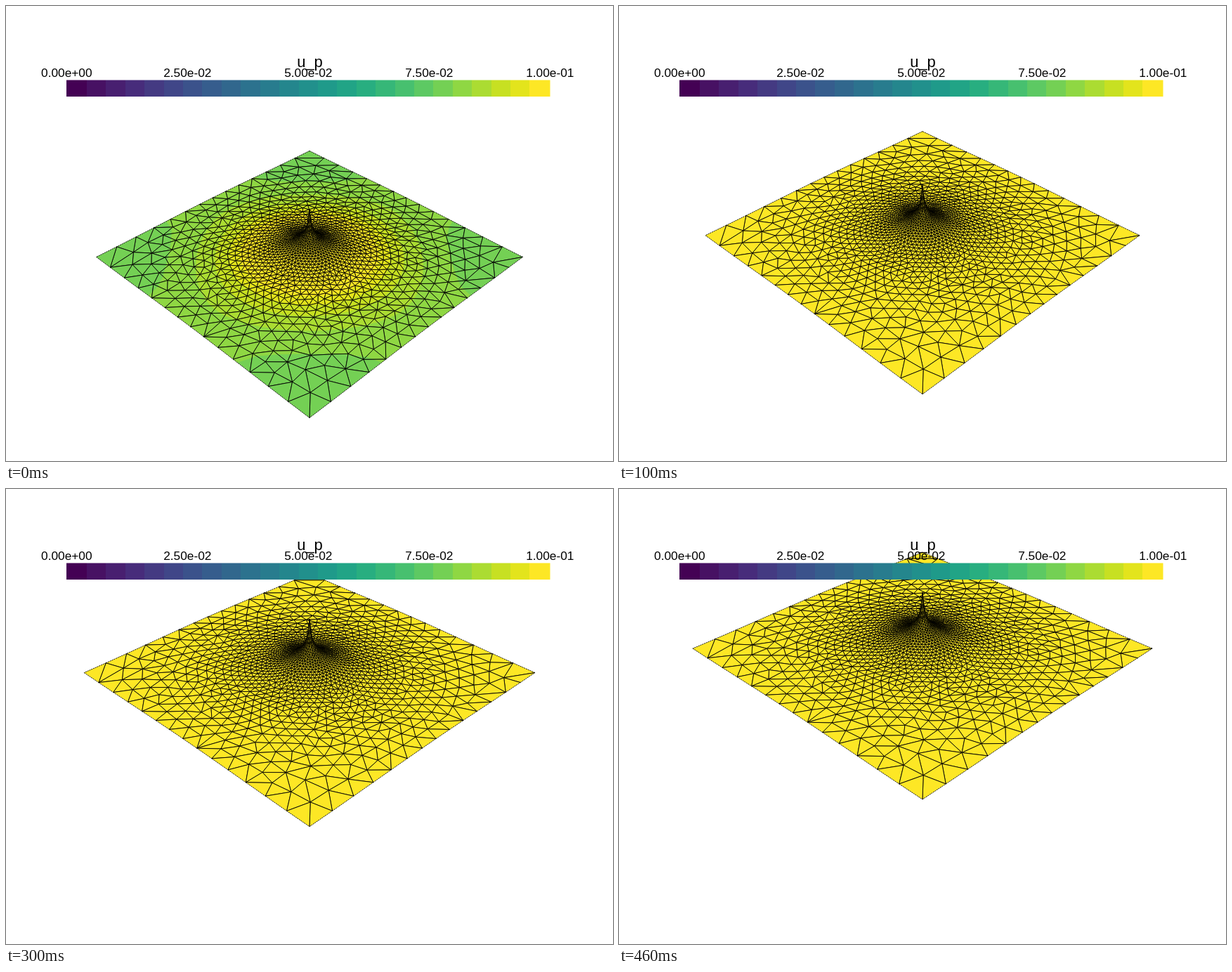
An HTML page with a canvas for the animation above (0.5 s loop, 864x648 px).

```html
<!DOCTYPE html>
<html lang="en">
<head>
<meta charset="utf-8">
<title>u_p</title>
<style>
html, body { margin: 0; width: 100%; height: 100%; overflow: hidden; background: #fff; }
canvas { display: block; }
</style>
</head>
<body>
<canvas id="stage" width="864" height="648"></canvas>
<script>
const ctx = document.getElementById('stage').getContext('2d');
const { abs, cos, sin, exp, log, hypot, floor, round, max, min, PI } = Math;
const STEP = 100, STEPS = 5, SIDE = 14, BANDS = 25;
const LOW = 0.0766, PEAK = 0.191, GAIN = 0.205, RISE = 0.088;

// Viridis colour map
const keys = ('440154 481567 482677 453781 404788 39568c 33638d 2d708e 287d8e 238a8d ' +
  '1f968b 20a387 29af7f 3cbb75 55c667 73d055 95d840 b8de29 dce319 fde725').split(' ')
  .map(k => [0, 2, 4].map(i => parseInt(k.slice(i, i + 2), 16)));
const colors = Array.from({ length: BANDS }, (_, i) => {
  const last = keys.length - 1, f = i / (BANDS - 1) * last, k = min(last - 1, floor(f));
  return `rgb(${keys[k].map((c, j) => round(c + (keys[k + 1][j] - c) * (f - k)))})`;
});
const band = u => max(0, min(BANDS - 1, floor(u * 250)));

// Point source in an insulated unit square
function green(x, y) {
  x = abs(x); y = abs(y);
  let g = y * y / 2 - y / 2 + 1 / 12;
  for (let n = -1; n <= 1; n++) {
    const e = exp(-2 * PI * abs(y + n));
    g -= log(1 - 2 * e * cos(2 * PI * x) + e * e) / (4 * PI);
  }
  return g;
}

// Graded mesh
let seed = 11;
const rand = () => {
  seed = (seed * 16807) % 2147483647;
  return seed / 2147483647 - 0.5;
};
const size = r => 0.0037 + 0.092 * r + 0.025 * r * r;

function seedPoints() {
  const pts = [[0, 0]];
  for (let r = size(0); r < 0.72; r += 0.866 * size(r)) {
    const h = size(r), n = round(2 * PI * r / h), phase = rand() * 6;
    for (let i = 0; i < n; i++) {
      const a = phase + 2 * PI * i / n;
      const x = r * cos(a) + rand() * h * 0.8, y = r * sin(a) + rand() * h * 0.8;
      if (max(abs(x), abs(y)) < 0.5 - 0.6 * h) pts.push([x, y]);
    }
  }
  const inner = pts.length;
  for (let i = 0; i < SIDE; i++) {
    const t = i / SIDE, s = t + 0.022 * sin(2 * PI * t) - 0.5;
    pts.push([s, -0.5], [0.5, s], [-s, 0.5], [-0.5, -s]);
  }
  return { pts, inner };
}

function triangulate(pts) {
  const n = pts.length, all = [...pts, [-60, -40], [60, -40], [0, 60]], base = n + 3;
  const make = (a, b, c) => {
    const [ax, ay] = all[a];
    const bx = all[b][0] - ax, by = all[b][1] - ay, cx = all[c][0] - ax, cy = all[c][1] - ay;
    const d = 2 * (bx * cy - by * cx), bb = bx * bx + by * by, cc = cx * cx + cy * cy;
    const x = (cy * bb - by * cc) / d, y = (bx * cc - cx * bb) / d;
    return { v: [a, b, c], x: ax + x, y: ay + y, r: x * x + y * y };
  };
  let tris = [make(n, n + 1, n + 2)];
  for (let i = 0; i < n; i++) {
    const [x, y] = all[i], keep = [], rim = new Set();
    for (const t of tris) {
      if ((t.x - x) ** 2 + (t.y - y) ** 2 >= t.r) { keep.push(t); continue; }
      for (let k = 0; k < 3; k++) {
        const a = t.v[k], b = t.v[(k + 1) % 3];
        if (!rim.delete(b * base + a)) rim.add(a * base + b);
      }
    }
    for (const e of rim) keep.push(make(floor(e / base), e % base, i));
    tris = keep;
  }
  return tris.map(t => t.v).filter(v => max(...v) < n);
}

function relax(pts, inner, tris, rounds) {
  const edges = new Set();
  for (const v of tris) v.forEach((a, k) => {
    const b = v[(k + 1) % 3];
    edges.add(min(a, b) * pts.length + max(a, b));
  });
  while (rounds--) {
    const push = pts.map(() => [0, 0]);
    for (const e of edges) {
      const a = floor(e / pts.length), b = e % pts.length;
      const dx = pts[b][0] - pts[a][0], dy = pts[b][1] - pts[a][1], len = hypot(dx, dy);
      const want = 1.12 * size(hypot(pts[a][0] + pts[b][0], pts[a][1] + pts[b][1]) / 2);
      const f = 0.18 * max(0, want / len - 1);
      push[a][0] -= f * dx; push[a][1] -= f * dy;
      push[b][0] += f * dx; push[b][1] += f * dy;
    }
    for (let i = 1; i < inner; i++)
      for (const k of [0, 1]) pts[i][k] = max(-0.455, min(0.455, pts[i][k] + push[i][k]));
  }
}

const { pts, inner } = seedPoints();
let tris = triangulate(pts);
for (let i = 0; i < 4; i++) {
  relax(pts, inner, tris, 6);
  tris = triangulate(pts);
}
const nodes = pts.map(([x, y], i) => ({
  q: (x - y) * Math.SQRT1_2,
  p: (x + y) * Math.SQRT1_2,
  u: LOW + (i ? min(PEAK, GAIN * (green(x, y) + 0.0552)) : PEAK)
}));
const far = v => v.reduce((s, i) => s + nodes[i].p, 0);
tris.sort((a, b) => far(b) - far(a));

const onRim = (a, b) => min(a, b) >= inner &&
  [0, 1].some(k => abs(pts[a][k]) === 0.5 && pts[a][k] === pts[b][k]);

// Isometric perspective camera
function project({ q, p, u }, lift) {
  const z = u + lift - LOW - PEAK / 2;
  const k = 1209 / (2.762 + 0.8165 * p - 0.57735 * z);
  return { x: 432 + q * k, y: 324 - (0.57735 * p + 0.8165 * z) * k, u: u + lift };
}

function trace(poly) {
  ctx.beginPath();
  for (const c of poly) ctx.lineTo(c.x, c.y);
  ctx.closePath();
}

// Part of a polygon where u exceeds a level
function above(poly, level) {
  const out = [];
  poly.forEach((a, i) => {
    const b = poly[(i + 1) % poly.length];
    if (a.u >= level) out.push(a);
    if (a.u >= level !== b.u >= level) {
      const f = (level - a.u) / (b.u - a.u);
      out.push({ x: a.x + f * (b.x - a.x), y: a.y + f * (b.y - a.y), u: level });
    }
  });
  return out;
}

function strokeEdges(view, v, rim) {
  ctx.setLineDash(rim ? [2, 1] : []);
  ctx.beginPath();
  v.forEach((a, k) => {
    const b = v[(k + 1) % 3];
    if (onRim(a, b) !== rim) return;
    ctx.moveTo(view[a].x, view[a].y);
    ctx.lineTo(view[b].x, view[b].y);
  });
  ctx.stroke();
}

function drawMesh(lift) {
  const view = nodes.map(n => project(n, lift));
  ctx.lineWidth = 0.9;
  ctx.strokeStyle = '#000';
  for (const v of tris) {
    const poly = v.map(i => view[i]), us = poly.map(c => c.u);
    const lo = band(min(...us)), hi = band(max(...us));
    for (let b = lo; b <= hi; b++) {
      trace(b === lo ? poly : above(poly, b / 250));
      ctx.fillStyle = colors[b];
      ctx.fill();
    }
    strokeEdges(view, v, false);
    strokeEdges(view, v, true);
  }
}

function drawBar() {
  const edge = i => i === 0 ? 86 : i === BANDS ? 774.5 : round(115 + 27.41 * (i - 1));
  colors.forEach((c, i) => {
    ctx.fillStyle = c;
    ctx.fillRect(edge(i), 105.5, edge(i + 1) - edge(i), 23.5);
  });
  ctx.fillStyle = '#000';
  ctx.textAlign = 'center';
  ctx.font = '17.3px "Liberation Sans", Arial, sans-serif';
  ['0.00e+00', '2.50e-02', '5.00e-02', '7.50e-02', '1.00e-01']
    .forEach((s, i) => ctx.fillText(s, 86.3 + 172 * i, 100.5));
  ctx.font = '22px "Liberation Sans", Arial, sans-serif';
  ctx.fillText('u_p', 432.5, 86.5);
}

function draw(step) {
  ctx.fillStyle = '#fff';
  ctx.fillRect(0, 0, 864, 648);
  drawMesh(RISE * step);
  drawBar();
}

let shown = -1;
const start = performance.now();
function tick() {
  const step = floor((performance.now() - start) / STEP) % STEPS;
  if (step !== shown) draw(shown = step);
  requestAnimationFrame(tick);
}
tick();
</script>
</body>
</html>
```
